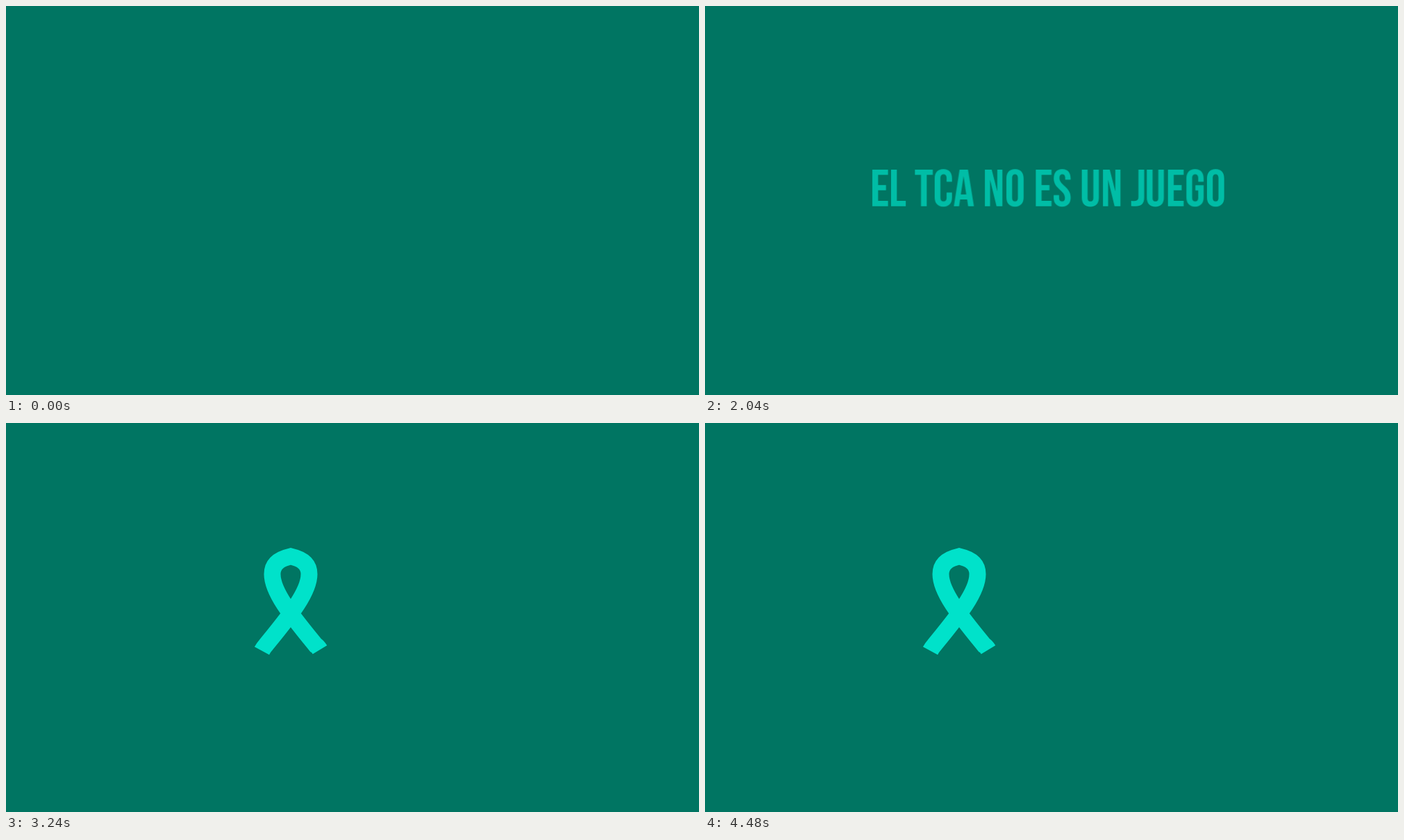
Animation of 998 by 561 pixels, one loop 5280 ms. Source, as an HTML page:

```html
<!DOCTYPE html>
<html lang="es">
<head>
<meta charset="utf-8">
<title>El TCA no es un juego</title>
<style>
  html, body { margin: 0; width: 100%; height: 100%; overflow: hidden; background: #007562; }
  svg { display: block; width: 998px; height: 561px; fill: #00e2ca; fill-rule: evenodd; }
  #ribbon { fill: none; stroke: #00e2ca; stroke-width: 24; }
</style>
</head>
<body>
<svg viewBox="0 0 998 561">
  <g id="slogan" role="img"></g>
  <g id="acronym" role="img"></g>
  <path id="ribbon" pathLength="1" d="M324.5 328.5Q327 323.8 330 320.5C362 281 392.5 245 392.5 218
    C392.5 203 382 196 366 192.4C350 196 339.5 203 339.5 218C339.5 245 370 281 402 320.5Q405 322 408 327"/>
</svg>
<script>
const LOOP = 5280, STEP = 40;

// Condensed display capitals, 700 units high: [advance, outline]
const GLYPHS = {
  ' ': [156, ''],
  '-': [220, 'M20 300H220V400H20Z'],
  E: [358, 'M41 0H341V100H151V295H302V395H151V600H341V700H41Z'],
  L: [334, 'M41 0H151V600H322V700H41Z'],
  T: [350, 'M8 0H350V100H234V700H124V100H8Z'],
  C: [392, 'M368 440V532C368 644 311 710 203 710S36 644 36 532V168C36 56 95 -10 203 -10S368 56 368 168V233H264V161C264 110 239 90 206 90S146 110 146 161V539C146 590 173 610 206 610S264 590 264 539V440Z'],
  A: [409, 'M121 0H282L396 700H285L266 573H131L112 700H12ZM145 477H249L197 124Z'],
  N: [417, 'M41 0H171L278 419V0H376V700H263L140 193V700H41Z'],
  O: [402, 'M36 168C36 56 95 -10 201 -10S366 56 366 168V532C366 644 307 710 201 710S36 644 36 532ZM146 161C146 110 168 90 201 90S256 110 256 161V539C256 590 234 610 201 610S146 590 146 539Z'],
  S: [370, 'M350 168V192H246V161C246 110 226 90 191 90S136 110 136 161C136 305 351 332 351 532C351 644 293 710 187 710S25 644 25 532V489H129V539C129 590 152 610 187 610S241 590 241 539C241 395 27 368 27 168C27 56 84 -10 189 -10S350 56 350 168Z'],
  U: [402, 'M148 0V541C148 592 170 610 203 610S258 592 258 541V0H364V534C364 646 308 710 201 710S38 646 38 534V0Z'],
  J: [270, 'M147 0H257V533C257 660 194 702 96 702C66 702 35 701 8 698V598C22 600 39 601 54 601C102 601 147 594 147 525Z'],
  G: [394, 'M207 300H366V532C366 644 307 710 201 710S36 644 36 532V168C36 56 95 -10 201 -10S366 56 366 168V233H262V161C262 110 237 90 204 90S146 110 146 161V539C146 590 171 610 204 610S262 590 262 539V400H207Z']
};

const byId = id => document.getElementById(id);
const clamp = v => Math.min(1, Math.max(0, v));
const progress = (t, from, to) => clamp((t - from) / (to - from));

function setLine(group, text, x, y, scale) {
  group.setAttribute('aria-label', text);
  group.setAttribute('transform', `translate(${x} ${y}) scale(${scale})`);
  let pen = 0;
  return [...text].map(char => {
    const [advance, outline] = GLYPHS[char];
    const path = document.createElementNS('http://www.w3.org/2000/svg', 'path');
    path.setAttribute('d', outline);
    path.setAttribute('transform', `translate(${pen} 0)`);
    group.append(path);
    pen += advance;
    return path;
  });
}

// Letters fade in one after another
function reveal(letters, p) {
  letters.forEach((letter, i) => letter.setAttribute('opacity', clamp(p * letters.length - i)));
}

const slogan = byId('slogan'), acronym = byId('acronym'), ribbon = byId('ribbon');
const sloganLetters = setLine(slogan, 'EL TCA NO ES UN JUEGO', 237.9, 236, 0.0752);
const acronymLetters = setLine(acronym, '-TCA', 429.1, 194, 0.193);

function draw(now) {
  const t = Math.floor(now % LOOP / STEP) * STEP;

  reveal(sloganLetters, progress(t, 0, 1000));
  slogan.setAttribute('opacity', 1 - progress(t, 2000, 2120));

  const drawn = progress(t, 2168, 3006);
  ribbon.setAttribute('visibility', drawn ? 'visible' : 'hidden');
  ribbon.setAttribute('stroke-dasharray', `${drawn * 1.001} 2`);
  ribbon.setAttribute('transform', `translate(${132 * (1 - progress(t, 3000, 3360))} 0)`);

  reveal(acronymLetters, t < 4480 ? progress(t, 3360, 3760) : 0);
  requestAnimationFrame(draw);
}
requestAnimationFrame(draw);
</script>
</body>
</html>
```
